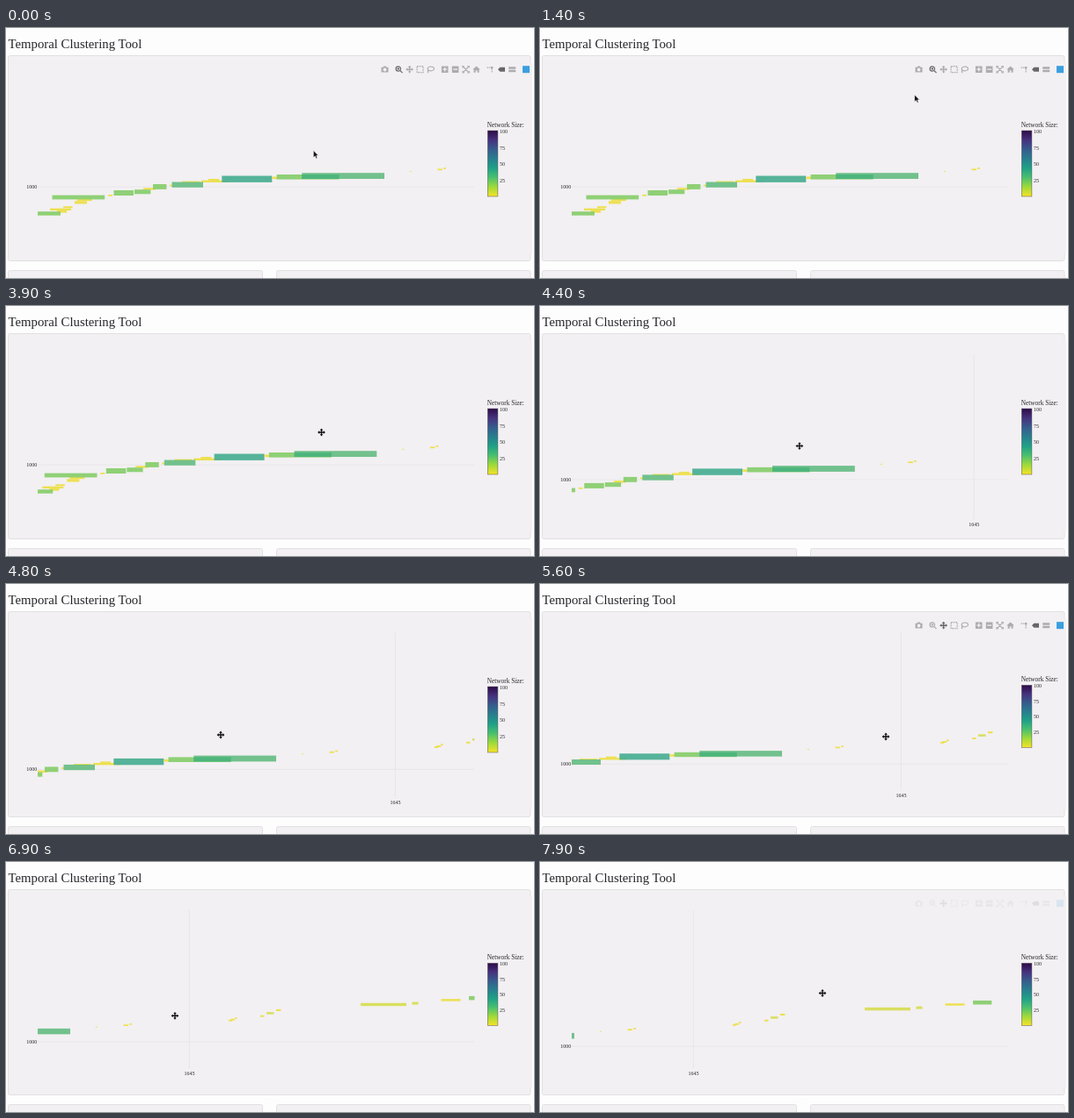
An HTML page for the animation above (8 s loop, 600 by 285 pixels).

```html
<!DOCTYPE html>
<html lang="en">
<head>
<meta charset="utf-8">
<title>Temporal Clustering Tool</title>
<style>
  html, body { margin: 0; width: 100%; height: 100%; overflow: hidden; background: #fdfdfe; }
  svg { display: block; width: 600px; height: 285px; }
  text { font-family: "Liberation Serif", "Times New Roman", serif; fill: #26262a; }
  .tick { font-size: 6px; }
  .card { fill: #f2f0f2; stroke: #dddbde; stroke-width: .8; }
  .grid { stroke: #e6e4e7; stroke-width: .8; }
  .icon { fill: none; stroke: currentColor; stroke-width: 1.2; color: #adabaf; }
  .icon.on { color: #68666b; }
  .solid { fill: currentColor; stroke: none; }
  .tip { font: bold 6.2px "Open Sans", Roboto, sans-serif; fill: #fff; }
</style>
</head>
<body>
<svg viewBox="0 0 600 285">
  <defs>
    <clipPath id="plot"><rect x="36" y="50" width="496.5" height="193"/></clipPath>
    <linearGradient id="scale" x1="0" y1="0" x2="0" y2="1"></linearGradient>
  </defs>
  <text x="2.6" y="23.2" font-size="14.75">Temporal Clustering Tool</text>
  <rect class="card" x="2.5" y="31.5" width="593.5" height="234" rx="2"/>
  <rect x="590" y="39" width="8" height="218" fill="#f2f0f2"/>
  <rect class="card" x="2.5" y="276.5" width="289" height="20" rx="2"/>
  <rect class="card" x="307.5" y="276.5" width="288.5" height="20" rx="2"/>

  <line id="hLine" class="grid" x1="36" x2="532"/>
  <line id="vLine" class="grid" y1="55"/>
  <g clip-path="url(#plot)"><g id="bars"></g></g>
  <text id="yTick" class="tick" x="35.3" text-anchor="end">1000</text>
  <text id="xTick" class="tick" text-anchor="middle">1645</text>

  <text id="barTitle" x="546.8" font-size="7.3">Network Size:</text>
  <rect id="colorBar" x="547.3" width="11.6" fill="url(#scale)" stroke="#55505a" stroke-width=".5"/>
  <g id="barTicks"></g>

  <g id="modeBar"></g>
  <g id="tip">
    <path d="M457 52.5l3 3h-6z" fill="#506784"/>
    <rect x="446.6" y="55" width="20.6" height="13.4" rx="1" fill="#506784"/>
    <text class="tip" x="457" y="64" text-anchor="middle">Pan</text>
  </g>

  <g id="arrow">
    <path d="M0 0V8.2L1.9 6.5 3.2 9.3 4.6 8.7 3.4 6H5.8Z" fill="#111" stroke="#fff" stroke-width=".6"/>
  </g>
  <g id="hand">
    <path d="M-.9 -4.6q.9-.9 1.7 0V-1.5l3.2.8q.8.3.7 1.2L4 4.4H-.8L-3.4 1q-.3-1.1.9-.8l1.6 1z"
      fill="#fff" stroke="#222" stroke-width=".8"/>
  </g>
  <g id="move">
    <path id="cross" d="M0 -4.4l1.9 2.1H.7V-.7H2.3V-1.9L4.4 0 2.3 1.9V.7H.7V2.3H1.9L0 4.4-1.9 2.3H-.7V.7H-2.3V1.9L-4.4 0-2.3-1.9V-.7H-.7V-2.3H-1.9Z"
      fill="#111" stroke="#fff" stroke-width="1" paint-order="stroke"/>
  </g>
</svg>
<script>
const LOOP = 8000, STEP = 100, TOP = 55;
const $ = id => document.getElementById(id);

function add(parent, tag, attrs, text) {
  const el = document.createElementNS("http://www.w3.org/2000/svg", tag);
  for (const k in attrs) el.setAttribute(k, attrs[k]);
  if (text) el.textContent = text;
  parent.appendChild(el);
  return el;
}
function set(el, attrs) {
  for (const k in attrs) el.setAttribute(k, attrs[k]);
}

// Bars: x, y, width, height, colour key
const colors = { y: "#eee04a", l: "#d9df58", g: "#8bcf70", m: "#6cbf88", t: "#4db096", o: "#4bb67c" };
const bars = [
  [50, 205.6, 24, 2.4, "y"], [65, 203.2, 10.5, 2, "y"], [58, 208, 11, 2.6, "y"],
  [36, 209.2, 26, 4.5, "g"],
  [81, 195, 17, 2.2, "y"], [78, 197.2, 14, 3.3, "y"],
  [52.5, 190.6, 59.7, 4.8, "g"], [116, 190, 5, 1.7, "y"],
  [122.5, 185, 22.5, 6, "g"], [156, 182.2, 14, 2.4, "y"],
  [146, 184.2, 18.3, 5.1, "g"], [167, 178, 15.4, 5.9, "g"],
  [186, 178.6, 4, 1.8, "y"], [200, 174.6, 20, 2, "y"],
  [222, 173.6, 31, 2.4, "y"], [230, 172, 12, 2, "y"],
  [188.5, 175.5, 35.5, 6.3, "m"], [245.3, 168.5, 57, 7.4, "t"],
  [302.3, 169.5, 6, 2.6, "y"], [307.6, 167, 71, 5.6, "g"],
  [336.3, 165.2, 93.7, 6.8, "m"], [336.3, 167, 42.3, 5, "o"],
  [458.8, 163, 2, 1, "y"], [490.5, 160.4, 5.4, 1.8, "y"], [497, 159.2, 3, 1.6, "y"],
  [610, 154.6, 4, 2, "y"], [612.5, 153.6, 4.5, 2, "y"], [617, 151.8, 2.4, 2, "y"],
  [646, 149.4, 4.5, 2, "y"], [653, 145.6, 8.5, 2.6, "l"], [664, 142.2, 5.4, 2.2, "y"],
  [760, 134.8, 52, 3.6, "l"], [818.5, 133.5, 7, 3.2, "l"],
  [851.5, 130, 22, 2.6, "y"], [883, 126.6, 21.3, 4.7, "g"]
];
for (const [x, y, width, height, c] of bars)
  add($("bars"), "rect", { x, y, width, height, fill: colors[c], opacity: .95 });

["#2d0b47", "#46327e", "#365c8d", "#277f8e", "#1fa187", "#4ac16d", "#a0da39", "#f5e326"]
  .forEach((c, i, a) => add($("scale"), "stop", { offset: i / (a.length - 1), "stop-color": c }));
const ticks = [100, 75, 50, 25].map(n => add($("barTicks"), "text", { class: "tick", x: 560.9 }, n));

// Toolbar icons, each drawn around its own centre
const cross = $("cross").getAttribute("d");
const solid = d => `<path class="solid" fill-rule="evenodd" d="${d}"/>`;
const line = d => `<path d="${d}"/>`;
const lens = '<circle cx="-.7" cy="-.7" r="2.7"/>' + line("M1.4 1.4L4 4M-2-.7H.6M-.7-2V.6");
const square = "M-3.8-3.8H3.8V3.8H-3.8Z";
const icons = {
  camera: [430.5, solid("M-4-2.5H-2L-1.2-3.6H1.2L2-2.5H4V3.3H-4ZM0-1.6A1.9 1.9 0 1 0 .01-1.6Z")],
  zoom: [446.5, lens],
  pan: [458.6, solid(cross)],
  select: [470.6, '<path stroke-dasharray="1.7 .9" d="M-3.5-3.5H3.5V3.5H-3.5Z"/>'],
  lasso: [482.4, '<ellipse cx=".4" cy="-.8" rx="3.6" ry="2.4"/>' + line("M-2.2 1q-1.6 1.2-.2 2.8")],
  zoomIn: [498.7, solid(square + "M-.6-2.4V-.6H-2.4V.6H-.6V2.4H.6V.6H2.4V-.6H.6V-2.4Z")],
  zoomOut: [510.6, solid(square + "M-2.4-.6V.6H2.4V-.6Z")],
  fit: [522.6, line("M-2.6-2.6L2.6 2.6M2.6-2.6L-2.6 2.6M-3.6-1.8V-3.6H-1.8M1.8-3.6H3.6V-1.8M3.6 1.8V3.6H1.8M-1.8 3.6H-3.6V1.8")],
  home: [534.6, solid("M0-3.8L4.2 0H3V3.6H.9V1H-.9V3.6H-3V0H-4.2Z")],
  spike: [550, '<path stroke-dasharray="1.6 .7" d="M-3.4-2H2.2V3.6"/>' + solid("M1-3.2H3.4V-.8H1Z")],
  closest: [563, solid("M-4 0L-1.6-2.5H4V2.5H-1.6Z")],
  compare: [575.2, solid("M-4-3H4V-.5H-4ZM-4 .6H4V3.1H-4Z")]
};
const icon = {};
for (const name in icons) {
  const [x, art] = icons[name];
  icon[name] = add($("modeBar"), "g", { class: "icon", transform: `translate(${x} 47.2)` });
  icon[name].innerHTML = art;
}
icon.closest.classList.add("on");
add($("modeBar"), "rect", { x: 587, y: 43.2, width: 8, height: 8, fill: "#3a9fe0" });

// Keys: time, values; "ease" slows both ends of the step that leads there
const pointer = [
  [700, 350, 144], [1800, 459, 53, "ease"], [2800, 459, 53],
  [3400, 367, 144, "ease"], [3600, 367, 144], [3900, 358.5, 144],
  [4800, 244, 172], [5100, 212, 173], [5600, 393, 174, "ease"],
  [6100, 331, 166], [6900, 192, 175.3], [7100, 158, 180],
  [7300, 158, 180], [7800, 321, 149.5, "ease"]
];
const pan = [
  [3600, 0, 0], [3900, -8.7, 0], [4800, -123, 30.4], [5100, -155, 31],
  [5600, -155, 31], [6100, -217, 22], [6900, -357, 30.7], [7100, -391, 36]
];
const fade = [
  [3600, 1], [3800, 0], [5100, 0], [5300, 1], [5600, 1], [5800, 0],
  [7100, 0], [7300, 1], [7700, 1], [7900, .13], [8000, 0]
];

function at(keys, t) {
  const i = keys.findIndex(k => k[0] > t);
  if (i === 0) return keys[0].slice(1);
  if (i < 0) return keys[keys.length - 1].slice(1);
  const a = keys[i - 1], b = keys[i];
  let p = (t - a[0]) / (b[0] - a[0]);
  if (b[3] === "ease") p = p * p * (3 - 2 * p);
  return [1, 2].map(n => a[n] + (b[n] - a[n]) * p);
}
const show = (el, on) => { el.style.display = on ? "" : "none"; };

function draw(t) {
  const [cx, cy] = at(pointer, t);
  const [dx, dy] = at(pan, t);
  const short = t >= 5100;               // plot shrinks once the first drag is let go
  const k = short ? .957 : 1;
  const bottom = short ? 235 : 243;

  set($("bars"), { transform: `translate(${dx} ${TOP + (dy - TOP) * k}) scale(1 ${k})` });
  const gy = TOP + (181 + dy - TOP) * k, gx = 565.4 + dx;
  set($("hLine"), { y1: gy, y2: gy });
  set($("yTick"), { y: gy + 2 });
  set($("vLine"), { x1: gx, x2: gx, y2: bottom });
  set($("xTick"), { x: gx, y: bottom + 8 });
  show($("vLine"), gx <= 532);
  show($("xTick"), gx <= 532);

  const y0 = short ? 115.3 : 117, h = short ? 71 : 75;
  set($("colorBar"), { y: y0, height: h });
  set($("barTitle"), { y: short ? 111 : 112.6 });
  ticks.forEach((el, i) => set(el, { y: y0 + 2.9 + i * h * .248 }));

  set($("modeBar"), { opacity: at(fade, t)[0] });
  icon.zoom.classList.toggle("on", t < 2300);
  icon.pan.classList.toggle("on", t >= 1800);
  show($("tip"), t >= 1800 && t < 2900);

  const kind = t < 1800 ? "arrow" : t < 2900 ? "hand" : "move";
  for (const id of ["arrow", "hand", "move"]) show($(id), id === kind);
  const [ox, oy] = kind === "arrow" ? [-.7, -4.4] : kind === "hand" ? [.6, 0] : [0, 0];
  set($(kind), { transform: `translate(${cx + ox} ${cy + oy})` });
}

const start = performance.now();
function tick() {
  const t = (performance.now() - start) % LOOP;
  draw(Math.floor(t / STEP) * STEP);
  requestAnimationFrame(tick);
}
draw(0);
requestAnimationFrame(tick);
</script>
</body>
</html>
```
